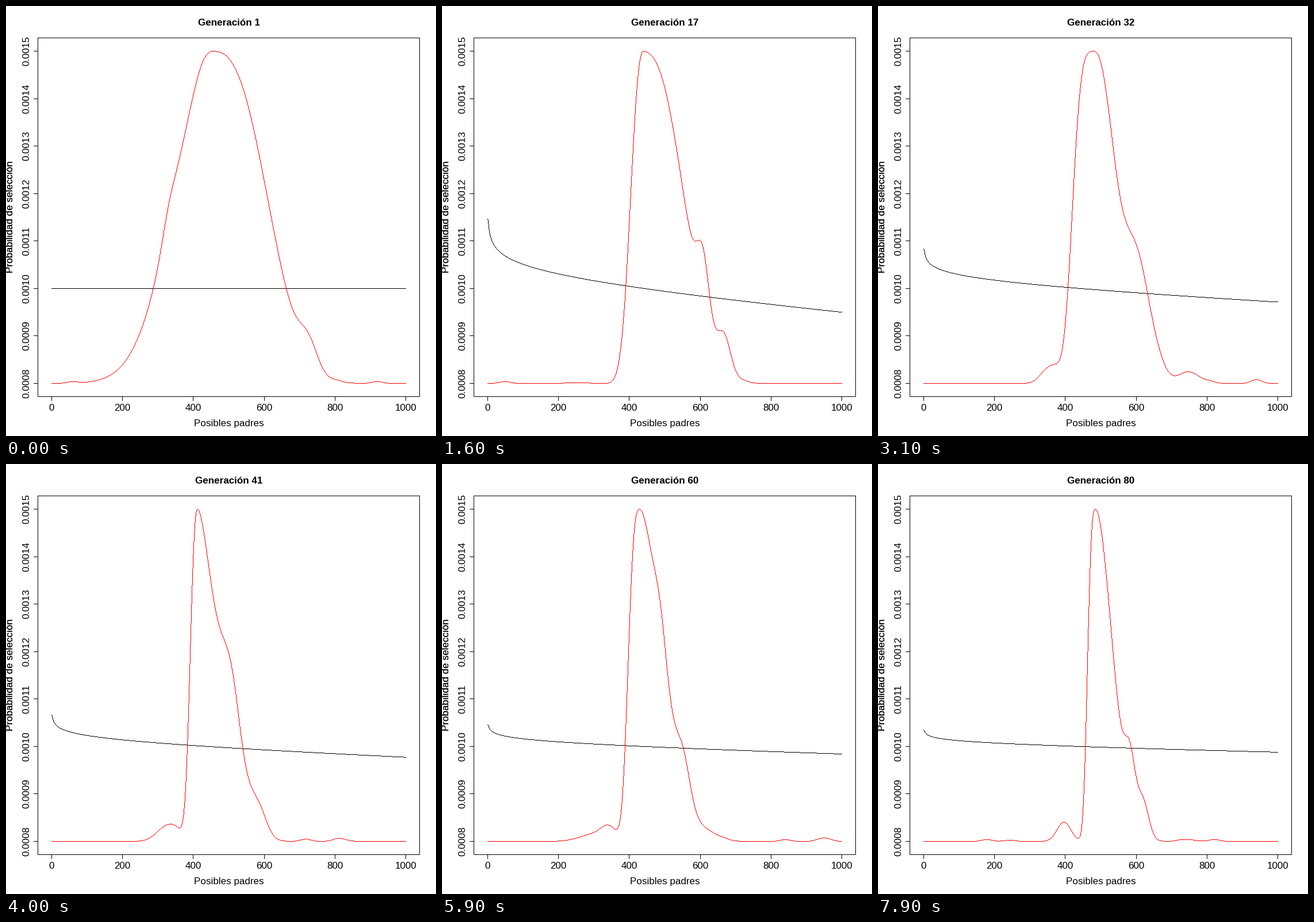
Recreate the animation shown at these times as a matplotlib script. Size 748 by 748 pixels, loop 8000 ms.

```python
import numpy as np
import matplotlib.pyplot as plt
from matplotlib.animation import FuncAnimation
from matplotlib.patches import Rectangle

SIZE, DPI = 748, 100
PT = 72 / DPI
FRAMES = 80
TOP, BASE = 78, 656
GRID = np.arange(79, 696)

plt.rcParams["font.family"] = ["Liberation Sans"]
plt.rcParams["path.simplify"] = False

# generation: (peak x, left half-width, left power, right half-width, right power),
#             bumps (offset from peak, height, width)
POSES = {
    1: ((361, 78, 2.0, 100, 2.6), [(-78, 0.04, 12), (164, 0.07, 16)]),
    17: ((351, 25, 2.5, 75, 2.5), [(103, 0.19, 11), (139, 0.115, 12)]),
    32: ((373, 36, 3.5, 40, 2.5), [(-68, 0.055, 16), (74, 0.39, 25), (167, 0.035, 18)]),
    41: ((333, 14, 2.5, 38, 1.7), [(-52, 0.048, 18), (59, 0.29, 18), (102, 0.09, 15)]),
    52: ((344, 32.5, 3.8, 50, 1.8), [(-76, 0.052, 26), (76, 0.15, 13), (121, 0.03, 15)]),
    67: ((356, 12.5, 2.4, 36, 1.7), [(-53, 0.055, 13), (36, 0.16, 10), (76, 0.05, 10)]),
    80: ((378, 14.5, 3.0, 34, 1.9), [(-55, 0.058, 12), (60, 0.15, 9), (82, 0.1, 10)]),
}
GENS = list(POSES)


def px(v):
    return 79 + 0.616 * v


def py(p):
    return 490.9 - (p - 0.001) * 825600


def bell(x, height, width):
    return height * np.exp(-((GRID - x) / width) ** 2 / 2)


def fitness(gen):
    """Density of the population, scaled to a peak of 1."""
    k = min(np.searchsorted(GENS, gen, side="right") - 1, len(GENS) - 2)
    t = (gen - GENS[k]) / (GENS[k + 1] - GENS[k])
    (body_a, bumps_a), (body_b, bumps_b) = POSES[GENS[k]], POSES[GENS[k + 1]]
    peak, left, lp, right, rp = (1 - t) * np.array(body_a) + t * np.array(body_b)

    # Every generation is a fresh sample: it wanders between the poses.
    rng = np.random.default_rng(gen)
    loose = min(1, 4 * t * (1 - t))
    peak += loose * rng.normal(0, 6)
    left *= 1 + loose * rng.normal(0, 0.06)
    right *= 1 + loose * rng.normal(0, 0.06)

    d = GRID - peak
    reach = np.where(d < 0, -d / left, d / right)
    h = 0.5 ** (reach ** np.where(d < 0, lp, rp))
    for weight, bumps in ((1 - t, bumps_a), (t, bumps_b)):
        for dx, height, width in bumps:
            h += weight * bell(peak + dx, height, width)
    for x in rng.uniform(100, 675, 8):
        h += bell(x, rng.uniform(0.002, 0.008), 9)
    return h / h.max()


def selection(gen):
    """Sorted selection probabilities, flattening as generations pass."""
    if gen == 1:
        return np.full(len(GRID), 0.001)
    u = np.clip((GRID - 79) / 616, 0.0013, 1)
    shape = 1.186 * (1 - u) - 0.414 * np.log(u) - 1
    return 0.001 * (1 + shape / (gen + 3))


def pixel_line(y):
    """One-pixel-wide column pieces that trace y over GRID."""
    mid = (y[:-1] + y[1:]) / 2
    edge = np.floor(np.concatenate([y[:1], mid, y[-1:]])) + 0.5
    lo, hi = np.sort([edge[:-1], edge[1:]], axis=0)
    flat, row = lo == hi, np.round(y)
    lo, hi = np.where(flat, row - 0.5, lo), np.where(flat, row + 0.5, hi)
    gap = np.full(len(y), np.nan)
    return np.column_stack([GRID, GRID, gap]).ravel(), np.column_stack([lo, hi, gap]).ravel()


fig = plt.figure(figsize=(SIZE / DPI, SIZE / DPI), dpi=DPI, facecolor="white")
ax = fig.add_axes([0, 0, 1, 1])
ax.set_xlim(-0.5, SIZE - 0.5)
ax.set_ylim(SIZE - 0.5, -0.5)
ax.axis("off")


def label(x, y, s, angle=0, weight="normal"):
    return ax.text(x, y, s, fontsize=17 * PT, rotation=angle, weight=weight,
                   ha="center", va="baseline", rotation_mode="anchor")


def stroke(xs, ys, color="black"):
    return ax.plot(xs, ys, color=color, lw=PT, snap=False, solid_capstyle="butt")[0]


box = Rectangle((55, 55), 664, 624, fill=False, lw=PT, snap=False)
ax.add_patch(box)
for v in range(0, 1001, 200):
    x = round(px(v))
    stroke([x, x], [679.5, 686.5])
    label(x, 704, str(v))
for n in range(8, 16):
    y = round(py(n / 10000))
    stroke([47.5, 54.5], [y, y])
    label(40, y, f"{n / 10000:.4f}", 90)
label(387, 731, "Posibles padres")
for _ in range(2):  # overprinted, so it looks darker
    label(12, 366.5, "Probabilidad de selección", 90)
title = label(387, 34, "", weight="bold")

black = stroke([], [])
red = stroke([], [], "red")
black.set_clip_path(box)


def update(i):
    gen = i + 1
    title.set_text(f"Generación {gen}")
    black.set_data(*pixel_line(py(selection(gen))))
    red.set_data(*pixel_line(BASE - (BASE - TOP) * fitness(gen)))
    return title, black, red


anim = FuncAnimation(fig, update, frames=FRAMES, interval=100,
                     init_func=lambda: update(0), repeat=True, repeat_delay=0)
plt.show()
```
